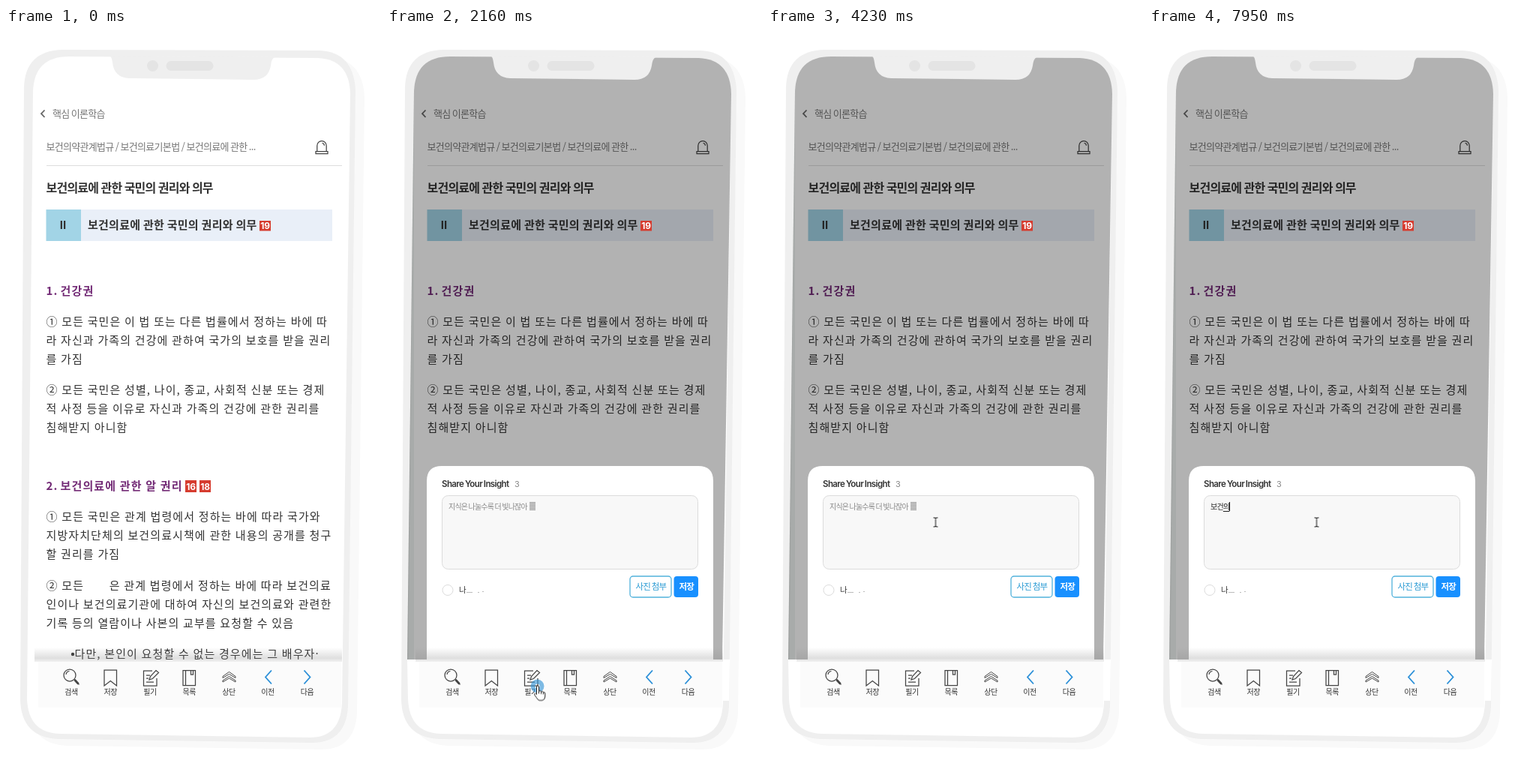
An HTML page for the animation above (8000 ms loop, 500 by 1000 pixels).

```html
<!DOCTYPE html>
<html lang="ko">
<head>
<meta charset="utf-8">
<title>학습 노트</title>
<style>
html, body { margin: 0; width: 100%; height: 100%; overflow: hidden; background: #fff; }
body { position: relative; font-family: 'Noto Sans CJK KR', 'Noto Sans CJK', sans-serif; word-spacing: -.65px; }
svg { position: absolute; left: 0; top: 0; width: 500px; height: 1000px; }
text { fill: #333; white-space: pre; }

.nav { font-size: 13px; letter-spacing: -.7px; fill: #777; }
.title { font-size: 16px; font-weight: 700; letter-spacing: -.77px; word-spacing: -.45px; }
.band { font-size: 15px; font-weight: 700; letter-spacing: .25px; word-spacing: -.75px; }
.body { font-size: 15px; letter-spacing: 1.1px; }
.head { font-size: 15px; letter-spacing: 1.1px; font-weight: 700; fill: #732b76; }
.badge { font: 700 12px Inter, sans-serif; fill: #fff; text-anchor: middle; letter-spacing: -.3px; }
.label { font-size: 10px; letter-spacing: -.5px; text-anchor: middle; }
.btn { font-size: 11.5px; letter-spacing: -.8px; font-weight: 500; }
.icon { fill: none; stroke: #444; stroke-width: 1.25; }
.arrow { fill: none; stroke: #2a8fd8; stroke-width: 1.8; }

/* Text field: one row per state, scrolled in hard steps */
.field { position: absolute; left: 82px; top: 630px; width: 125px; height: 16px; overflow: hidden; }
.rows { animation: type 8s step-end infinite; }
.rows p { margin: 0; height: 16px; line-height: 15px; font-size: 10px; letter-spacing: -.8px;
  white-space: pre; color: #222; display: flex; align-items: flex-start; }
.rows .hint { color: #888; position: relative; }
.rows u { text-underline-offset: 2px; text-decoration-thickness: 1px; }
.rows i { width: 1px; height: 12px; margin-top: 2px; background: #111; }
.rows .hint i { position: absolute; left: 0; }
.emo { width: 8px; height: 11px; margin: 2px 0 0 3.5px;
  background: repeating-linear-gradient(#999 0 1px, #ddd 1px 2px); }

.popup { animation: popup 8s step-end infinite; }
.cursor { animation: move 8s linear infinite, enter 8s step-end infinite; }
.beam { animation: beam 8s step-end infinite; }
.hand { animation: hand 8s step-end infinite; }
.tip { animation: tip 8s step-end infinite; }
.ripple { fill: none; stroke: #2f92d6; animation: ripple 8s linear infinite; }

@keyframes popup { 0% { visibility: hidden; } 26.98%, 100% { visibility: visible; } }
@keyframes enter { 0% { visibility: hidden; } 11.23%, 100% { visibility: visible; } }
@keyframes move {
  0%, 11.2% { transform: translate(40px, 648px); }
  14.625% { transform: translate(118px, 666px); animation-timing-function: ease-out; }
  20.6%, 31.4% { transform: translate(201px, 877.5px); animation-timing-function: ease-in-out; }
  42.5%, 43.6% { transform: translate(223.5px, 664px); animation-timing-function: ease-out; }
  52%, 100% { transform: translate(223.5px, 659px); }
}
@keyframes beam { 0% { opacity: 1; } 18% { opacity: 0; } 38.2%, 100% { opacity: 1; } }
@keyframes hand { 0% { opacity: 0; } 18% { opacity: 1; } 34.3%, 100% { opacity: 0; } }
@keyframes tip { 0% { opacity: 0; } 34.3% { opacity: 1; } 38.2%, 100% { opacity: 0; } }
@keyframes ripple {
  0%, 25.8% { r: 1px; stroke-width: 2px; opacity: 0; }
  25.9% { r: 1.5px; stroke-width: 3px; opacity: .8; }
  26.6% { r: 3.5px; stroke-width: 7px; opacity: .8; }
  27% { r: 6px; stroke-width: 6px; opacity: .62; }
  28.4%, 100% { r: 9px; stroke-width: 2px; opacity: 0; }
}
@keyframes type {
  0%, 68.6%, 80.6% { transform: none; }
  62.6%, 74.22%, 86.22% { transform: translateY(-16px); }
  89.6% { transform: translateY(-32px); }
  91.1% { transform: translateY(-48px); }
  92.97% { transform: translateY(-64px); }
  94.1% { transform: translateY(-80px); }
  95.22% { transform: translateY(-96px); }
  96.72% { transform: translateY(-112px); }
  97.85% { transform: translateY(-128px); }
  99.35%, 100% { transform: translateY(-144px); }
}
</style>
</head>
<body>
<svg viewBox="0 0 500 1000">
  <defs>
    <path id="shell" d="M24 80Q25 30 76 29L418 30Q464 32 466 84L456 905Q453 953 408 953L70 948Q20 946 19 895Z"/>
    <linearGradient id="fade" x2="0" y2="1">
      <stop offset="0" stop-color="#888" stop-opacity="0"/>
      <stop offset=".75" stop-color="#888" stop-opacity=".27"/>
      <stop offset="1" stop-color="#888" stop-opacity=".12"/>
    </linearGradient>
  </defs>

  <!-- phone -->
  <use href="#shell" x="12" y="9" fill="#f9f9f9"/>
  <use href="#shell" fill="#efefef"/>
  <path d="M36 84Q38 38 84 38L416 40Q458 42 459 88L448 900Q446 946 405 946L72 941Q30 940 28 895Z" fill="#fff"/>

  <!-- page -->
  <path d="M51.5 109.5L47 114.2L51.5 119" fill="none" stroke="#666" stroke-width="1.8"/>
  <text class="nav" x="62" y="118.5">핵심 이론학습</text>
  <text class="nav" x="53.5" y="163">보건의약관계법규 / 보건의료기본법 / 보건의료에 관한 ...</text>
  <path class="icon" d="M414.800 164.500V157a6.200 6.500 0 0 1 12.400 0V164.500M413 164.500H429V167.500H413ZM421.500 153.500q2.700 .3 3 3.200" stroke-width="1.1"/>
  <path d="M54 183.500H448" stroke="#ddd"/>
  <text class="title" x="53.5" y="218.500">보건의료에 관한 국민의 권리와 의무</text>
  <path d="M100 242H435V284H100Z" fill="#e9eff8"/>
  <path d="M53.500 242H100V284H53.500Z" fill="#a2d4e6"/>
  <text x="76" y="268" text-anchor="middle" style="font:700 15px Inter,sans-serif">II</text>
  <text class="band" x="109" y="267.500">보건의료에 관한 국민의 권리와 의무</text>

  <text class="head" x="53.500" y="355.500">1. <tspan x="72.600">건강권</tspan></text>
  <g class="body">
    <text x="53.500" y="397">① 모든 국민은 이 법 또는 다른 법률에서 정하는 바에 따</text>
    <text x="53.500" y="421.500">라 자신과 가족의 건강에 관하여 국가의 보호를 받을 권리</text>
    <text x="53.500" y="446.500">를 가짐</text>
    <text x="53.500" y="488">② 모든 국민은 성별, 나이, 종교, 사회적 신분 또는 경제</text>
    <text x="53.500" y="513">적 사정 등을 이유로 자신과 가족의 건강에 관한 권리를</text>
    <text x="53.500" y="538">침해받지 아니함</text>
    <text x="53.500" y="657">① 모든 국민은 관계 법령에서 정하는 바에 따라 국가와</text>
    <text x="53.500" y="682">지방자치단체의 보건의료시책에 관한 내용의 공개를 청구</text>
    <text x="53.500" y="707">할 권리를 가짐</text>
    <text x="53.500" y="748.500">② 모든<tspan x="137.800">은 관계 법령에서 정하는 바에 따라 보건의료</tspan></text>
    <text x="53.500" y="773.500">인이나 보건의료기관에 대하여 자신의 보건의료와 관련한</text>
    <text x="53.500" y="798.500">기록 등의 열람이나 사본의 교부를 요청할 수 있음</text>
    <circle cx="89" cy="835" r="2.200" fill="#333"/>
    <text x="91.500" y="840">다만, 본인이 요청할 수 없는 경우에는 그 배우자·</text>
  </g>
  <text class="head" x="53.500" y="615.500">2. <tspan x="72.600">보건의료에 관한 알 권리</tspan></text>
  <path d="M239 603H254V619H239ZM258 603H273V619H258Z" fill="#d63c2f"/>
  <text class="badge" x="246.500" y="615.700">16</text>
  <text class="badge" x="265.500" y="615.700">18</text>

  <!-- dimmed page and note sheet -->
  <g class="popup">
    <path d="M36 84Q38 38 84 38L416 40Q458 42 459 88L447 842H27Z" opacity=".3"/>
    <path d="M36 84V842H27Z" fill="#6f7f7c" opacity=".15"/>
    <path d="M53 842V604Q53 584 73 584H415Q435 584 435 604V842Z" fill="#fff"/>
    <text x="73" y="611.500" style="font:600 11.5px Inter,sans-serif;letter-spacing:-.6px">Share Your Insight</text>
    <text x="170" y="611.500" style="font:11px Inter,sans-serif;fill:#888">3</text>
    <rect x="73.500" y="623.500" width="341" height="98" rx="8" fill="#f8f8f8" stroke="#dcdcdc"/>
    <circle cx="81" cy="749.500" r="7" fill="#fff" stroke="#dcdcdc"/>
    <text x="96" y="752.500" style="font-size:10.5px">나</text>
    <path d="M106 752.500H114M121 752.500H123M127 751.500H129" stroke="#bbb"/>
    <rect x="324" y="731" width="55" height="28" rx="4" fill="#fff" stroke="#52b2dc" stroke-width="1.300"/>
    <text class="btn" x="331.500" y="749" style="fill:#2b9bd4">사진 첨부</text>
    <rect x="382.500" y="731" width="32.500" height="28" rx="4" fill="#1890ff"/>
    <text class="btn" x="389.500" y="749" style="fill:#fff;font-weight:700">저장</text>
  </g>
  <path d="M338 257H353V270.500H338Z" fill="#d63c2f"/>
  <text class="badge" x="345.500" y="268.300">19</text>

  <!-- notch -->
  <path d="M138 37Q141 38 142 46Q144 66 164 67L330 69Q350 69 353 50Q354 41 358 39Z" fill="#efefef"/>
  <circle cx="195.500" cy="50.500" r="7.500" fill="#e4e4e4"/>
  <rect x="213.500" y="44" width="63" height="13" rx="6.500" fill="#e4e4e4"/>

  <!-- toolbar -->
  <path class="popup" d="M27 842H457L456 897H28Z" fill="#fff"/>
  <rect x="38" y="826" width="410" height="19" fill="url(#fade)"/>
  <path d="M43 845H447V906H43Z" fill="#fbfbfb"/>
  <g class="icon">
    <circle cx="85" cy="863" r="8"/>
    <path d="M80 862q.5-4 4.500-4.500M91 868.500L97.500 875.500" />
    <path d="M91.500 869L96.500 874.500" stroke-width="2.800"/>
    <path d="M131 856H147.500V877L139.300 870.500L131 877Z"/>
    <path d="M195 857H183.500V877H201V867M187 863H192M187 867H190M187 872H197M191 869L192.500 864.500L200 856.500L203.500 859.500L195.500 867.500Z"/>
    <path d="M236 856.500H252.500V876.500H236ZM239.500 856.500V876.500M246.500 857V862H249.500V857"/>
    <path d="M289 864.500L297.500 858.500L306 864.500V866.500L297.500 861.500L289 866.500ZM289 870L297.500 864.500L306 870V872L297.500 867L289 872Z" stroke-width="1"/>
  </g>
  <path class="arrow" d="M354 856.500L346 865.500L354 874.500M397.500 856.500L405.500 865.500L397.500 874.500"/>
  <g>
    <text class="label" x="87" y="889">검색</text>
    <text class="label" x="139.300" y="889">저장</text>
    <text class="label" x="192" y="889">필기</text>
    <text class="label" x="244.300" y="889">목록</text>
    <text class="label" x="297" y="889">상단</text>
    <text class="label" x="349" y="889">이전</text>
    <text class="label" x="401.500" y="889">다음</text>
  </g>
</svg>

<div class="field popup">
  <div class="rows">
    <p class="hint">지식은 나눌수록 더 빛나잖아<span class="emo"></span></p>
    <p class="hint"><i></i>지식은 나눌수록 더 빛나잖아<span class="emo"></span></p>
    <p><u>ㅂ</u><i></i></p>
    <p><u>보</u><i></i></p>
    <p><u>복</u><i></i></p>
    <p>보<u>거</u><i></i></p>
    <p>보<u>건</u><i></i></p>
    <p>보건<u>ㅇ</u><i></i></p>
    <p>보건<u>으</u><i></i></p>
    <p>보건<u>의</u><i></i></p>
  </div>
</div>

<svg viewBox="0 0 500 1000">
  <circle class="ripple" cx="200.500" cy="877.500" r="1"/>
  <g class="cursor">
    <path class="beam" d="M-3 -6H-1L0 -5L1 -6H3M0 -5V5M-3 6H-1L0 5L1 6H3" fill="none" stroke="#222" stroke-width="1.100"/>
    <path class="hand" d="M-1.500 9V1Q-1.500 -.5 0 -.5T1.500 1V6.500Q4 5 4.500 7.500Q7 6 7.300 8.300Q9.800 7.500 9.800 10V14Q9.500 18.500 6 19H2Q0 18.500 -1.500 15.500L-4.500 11.500Q-4.500 8.500 -1.500 11ZM1.500 6.500V10M4.500 7.500V10.500M7.300 8.300V11" fill="#fff" stroke="#222"/>
    <path class="tip" d="M0 0V15L3.500 11.800L6 17L8 16L5.700 11H10.500Z" fill="#fff" stroke="#222"/>
  </g>
</svg>
</body>
</html>
```
